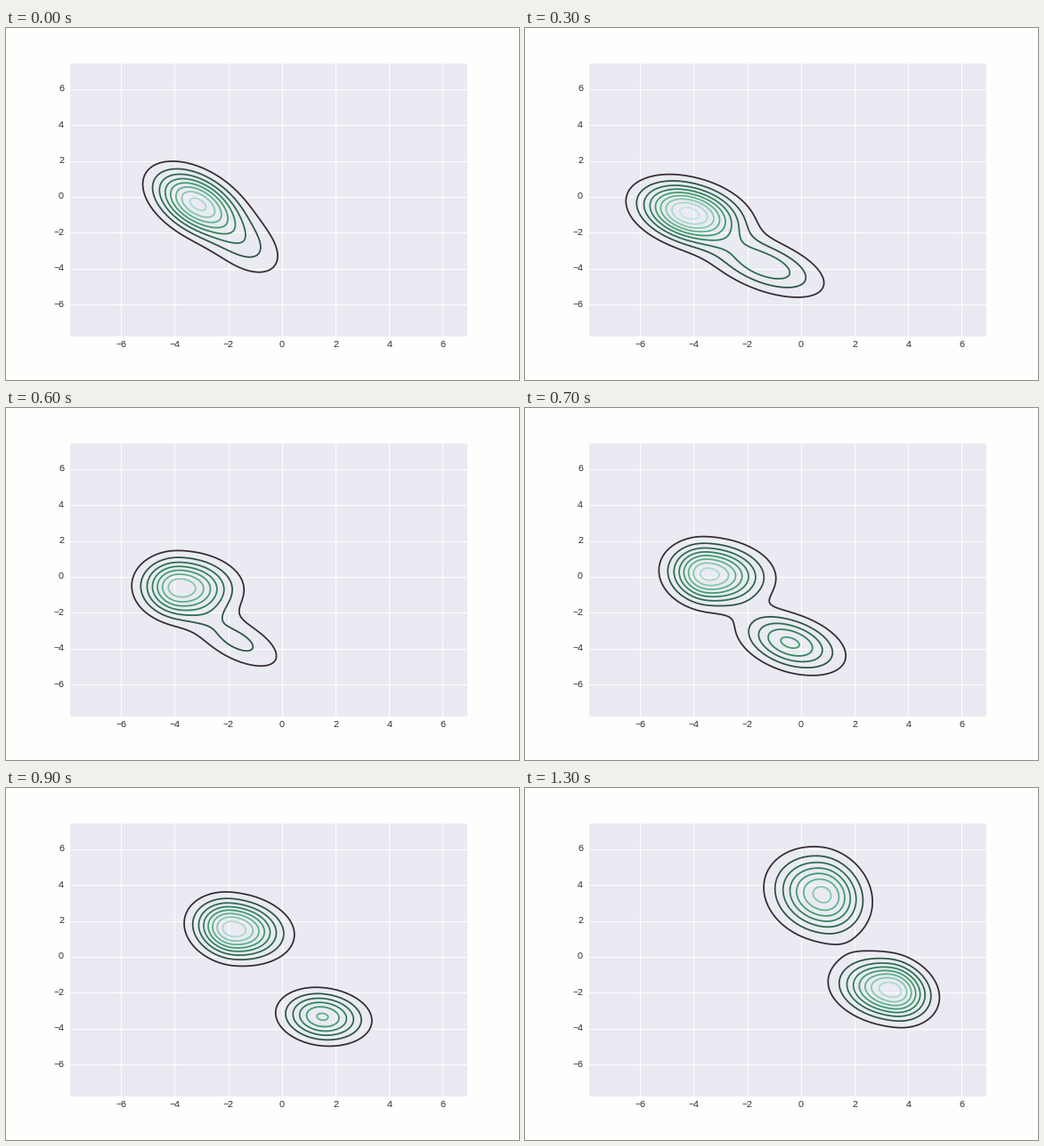
Recreate the animation shown at these times as a matplotlib script. Size 576 by 396 pixels, loop 1.4 s.

```python
import numpy as np
import matplotlib.pyplot as plt
from matplotlib.animation import FuncAnimation

FRAMES, INTERVAL = 14, 100
SHADES = ["#352c31", "#2c5344", "#2a6b4e", "#2d8257", "#3d9b6b",
          "#5bb187", "#82c7ab", "#a9d9cd", "#c3e4e1"]

# Two drifting hills in stage pixels, keyed by time in ms:
# centre x, centre y, width, height, tilt, skew, weight
KEY_TIMES = [0, 200, 400, 600, 800, 1100, 1300]
UPPER_HILL = np.array([
    (214, 197, 29.5, 23, .45, 0, 1),
    (181, 208, 31, 20, .36, .05, 1),
    (187, 208, 37.5, 21, .25, 0, 1),
    (196, 202, 31, 20.5, .05, .13, 1),
    (217, 172, 32.5, 20.5, .15, .16, 1),
    (332, 132, 24, 19, .15, 0, 1),
    (334, 120, 30.5, 27, .15, -.08, .85),
])
LOWER_HILL = np.array([
    (268, 243, 29, 25, .45, 0, .27),
    (277, 272, 44, 20, .55, 0, .48),
    (262, 262, 37, 24, .55, 0, .33),
    (260, 262, 34, 22, .6, 0, .29),
    (335, 266, 33.5, 18.5, .2, .04, .95),
    (396, 240, 18, 15, 0, 0, .2),
    (411, 227, 30, 20.5, .2, -.13, 1),
])
PEAK_LEVEL = [8.35, 9.4, 9.5, 7.9, 9.02, 8.35, 8.7]

plt.rcParams.update({
    "font.family": "Liberation Sans",
    "text.hinting": "default",
    "text.hinting_factor": 1,
    "ytick.alignment": "center",
})
fig = plt.figure(figsize=(8, 5.5), dpi=72, facecolor="#fefefd")
ax = fig.add_axes([0.125, 0.125, 0.775, 0.775], facecolor="#eaeaf2")

# The axes work in stage pixels; the tick labels carry the data values.
values = np.arange(-6, 7, 2)
names = [str(v).replace("-", "\u2212") for v in values]
ax.set_xlim(72, 518.4)
ax.set_ylim(346.5, 39.6)
ax.set_xticks(309.85 + 30.1 * values, names)
ax.set_yticks(190 - 20.17 * values, names)
ax.tick_params(length=0, labelsize=10, labelcolor="#262626")
ax.tick_params(axis="x", pad=5.5)
ax.tick_params(axis="y", pad=7)
ax.grid(color="white", linewidth=1)
ax.set_axisbelow(True)
for spine in ax.spines.values():
    spine.set_visible(False)

grid_x, grid_y = np.meshgrid(np.linspace(72, 518, 224), np.linspace(40, 347, 154))
drawn = []


def at(time, keys):
    """Glide linearly between the key values, column by column."""
    return [np.interp(time, KEY_TIMES, column) for column in np.transpose(keys)]


def hill(cx, cy, width, height, tilt, skew, weight):
    u, v = (grid_x - cx) / width, (grid_y - cy) / height
    u = u / (1 + skew * np.tanh(2 * u))
    distance = (u * u - 2 * tilt * u * v + v * v) / (1 - tilt**2)
    return weight * np.exp(-distance / 2)


def update(frame):
    while drawn:
        drawn.pop().remove()
    time = frame * INTERVAL
    density = hill(*at(time, UPPER_HILL)) + hill(*at(time, LOWER_HILL))
    peak = np.interp(time, KEY_TIMES, PEAK_LEVEL)
    levels = density.max() / peak * np.arange(1, len(SHADES) + 1)
    drawn.append(ax.contour(grid_x, grid_y, density, levels,
                            colors=SHADES, linewidths=1.75))
    return drawn


anim = FuncAnimation(fig, update, frames=FRAMES, init_func=lambda: drawn,
                     interval=INTERVAL, repeat=True, repeat_delay=0, blit=False)
plt.show()
```
